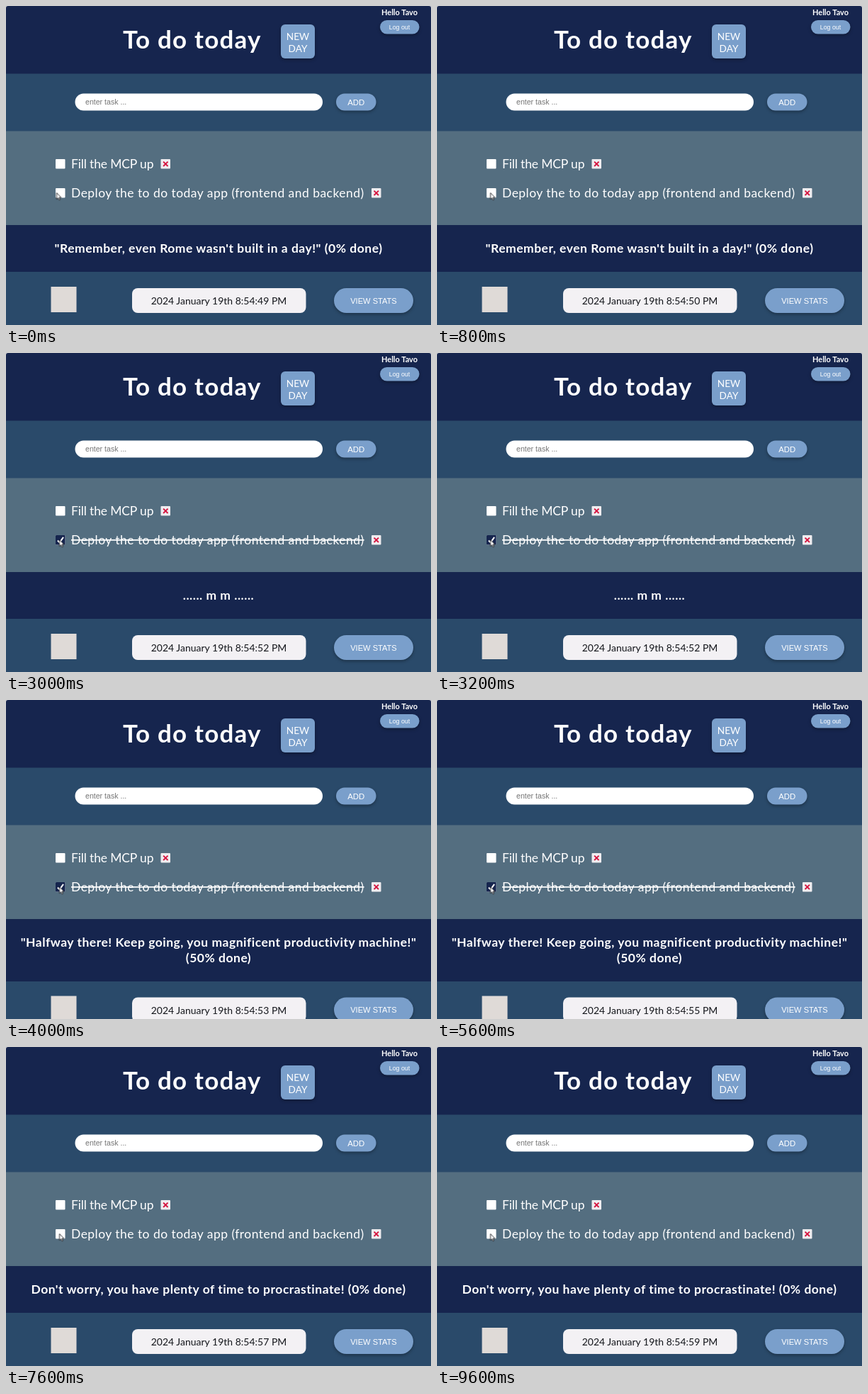
An HTML page that plays this animation: 600 by 450 pixels, repeating every 10 s.

```html
<!DOCTYPE html>
<html lang="en">
<head>
<meta charset="utf-8">
<title>To do today</title>
<style>
  html, body { margin: 0; width: 100%; height: 100%; overflow: hidden; background: #c9ccd4; }
  svg { display: block; width: 600px; height: 450px; border-radius: 3px 3px 0 0; }
  text { fill: #fff; font-family: Lato, "Open Sans", sans-serif; white-space: pre; }
  .mid { text-anchor: middle; }
  .title { font-size: 35px; font-weight: 700; letter-spacing: 1.2px; }
  .user { font-size: 11px; font-weight: 700; }
  .day { font-size: 13.6px; }
  .ui { font-family: "Liberation Sans", Arial, sans-serif; }
  .task { font-size: 17.5px; }
  .quote { font-size: 17.5px; font-weight: 700; letter-spacing: .5px; text-anchor: middle; }
  .clock { font-size: 14px; fill: #15171c; }
  .navy { fill: #16254e; }
  .blue { fill: #2a4a6a; }
  .btn rect { fill: #7a9fcb; filter: drop-shadow(0 2.5px 2px rgba(0, 0, 0, .32)); }

  .start, .think, .half, .idle, .tick, .struck, .foot, .cursor {
    animation: 10s step-end infinite;
  }
  .start { animation-name: start; }
  .think { animation-name: think; }
  .half { animation-name: half; }
  .idle { animation-name: idle; }
  .tick { animation-name: tick; }
  .struck { animation-name: struck; }
  .foot { animation-name: foot; }
  .cursor { animation-name: cursor; }
  @keyframes start { 0% { opacity: 1 } 26%, 100% { opacity: 0 } }
  @keyframes think { 0%, 36%, 72%, 100% { opacity: 0 } 26%, 62% { opacity: 1 } }
  @keyframes half { 0%, 62%, 100% { opacity: 0 } 36% { opacity: 1 } }
  @keyframes idle { 0% { opacity: 0 } 72%, 100% { opacity: 1 } }
  @keyframes tick { 0%, 62%, 100% { opacity: 0 } 26% { opacity: 1 } }
  @keyframes struck { 0%, 62%, 100% { text-decoration: none } 26% { text-decoration: line-through } }
  @keyframes foot { 0%, 62%, 100% { transform: none } 36% { transform: translateY(21.5px) } }
  @keyframes cursor { 0% { transform: translate(71.5px, 263.5px) } 2%, 100% { transform: translate(75.5px, 263.5px) } }
</style>
</head>
<body>
<svg viewBox="0 0 600 450">
  <defs>
    <g id="remove">
      <rect width="13.5" height="13.5" rx="1" fill="#efedf0"/>
      <path d="M3.6 3.6L10 10M10 3.6L3.6 10" stroke="#d5143f" stroke-width="1.9"/>
    </g>
    <rect id="box" width="13.5" height="13.5" rx="1"/>
  </defs>

  <rect class="navy" width="600" height="450"/>
  <rect class="blue" y="95.5" width="600" height="82"/>
  <rect y="176.5" width="600" height="132.5" fill="#546e80"/>

  <text class="title" x="165" y="60">To do today</text>
  <g class="btn mid">
    <rect x="388" y="26" width="48" height="48" rx="6"/>
    <text class="day" x="412" y="47.5">NEW</text>
    <text class="day" x="412" y="65">DAY</text>
  </g>
  <text class="user mid" x="555.5" y="13">Hello Tavo</text>
  <g class="btn mid">
    <rect x="528" y="20" width="55.5" height="19.5" rx="9.75"/>
    <text class="ui" x="555.5" y="32.5" font-size="8.8">Log out</text>
  </g>

  <rect x="97.5" y="123.5" width="349.5" height="24" rx="12" fill="#fff"/>
  <text class="ui" x="112" y="139" font-size="10.6" style="fill:#757575">enter task ...</text>
  <g class="btn mid">
    <rect x="466" y="123.5" width="56.5" height="24" rx="12"/>
    <text class="ui" x="494.3" y="139.5" font-size="11.4">ADD</text>
  </g>

  <use href="#box" x="70" y="216" fill="#fff"/>
  <text class="task" x="92" y="228.5" letter-spacing="-.15">Fill the MCP up</text>
  <use href="#remove" x="218.5" y="216"/>
  <use href="#box" x="70" y="257" fill="#fff"/>
  <g class="tick">
    <use href="#box" x="70" y="257" fill="#16254e"/>
    <path d="M73 264.5L75.6 267.4L81 259.8" fill="none" stroke="#fff" stroke-width="2"/>
  </g>
  <text class="task struck" x="92" y="269.5" letter-spacing=".46">Deploy the to do today app (frontend and backend)</text>
  <use href="#remove" x="516" y="257"/>

  <g class="quote">
    <text class="start" x="300" y="348">"Remember, even Rome wasn't built in a day!" (0% done)</text>
    <text class="think" x="300" y="348">...... m m ......</text>
    <g class="half">
      <text x="300" y="348">"Halfway there! Keep going, you magnificent productivity machine!"</text>
      <text x="300" y="369.5">(50% done)</text>
    </g>
    <text class="idle" x="300" y="348">Don't worry, you have plenty of time to procrastinate! (0% done)</text>
  </g>

  <g class="foot">
    <rect class="blue" y="375" width="600" height="76"/>
    <rect x="63.5" y="396" width="36" height="36" fill="#dfdad7"/>
    <rect x="178" y="398" width="245.5" height="35" rx="8" fill="#f3f1f4"/>
    <text class="clock mid" id="clock" x="300.5" y="421">2024 January 19th 8:54:49 PM</text>
    <g class="btn mid">
      <rect x="463" y="398" width="112" height="35" rx="17.5"/>
      <text class="ui" x="519" y="419.5" font-size="11.1">VIEW STATS</text>
    </g>
  </g>

  <path class="cursor" d="M0 0V9.2L2.1 7.3L3.6 10.4L5 9.7L3.6 6.7H6.4Z" fill="#fff" stroke="#1a1a1e" stroke-width=".9"/>
</svg>
<script>
  const clock = document.getElementById("clock");
  let shown = 49;

  function draw() {
    const t = performance.now() % 10000;
    const sec = 49 + Math.floor((t + 600) / 1000);
    if (sec !== shown) {
      shown = sec;
      clock.textContent = `2024 January 19th 8:54:${sec} PM`;
    }
    requestAnimationFrame(draw);
  }
  draw();
</script>
</body>
</html>
```
